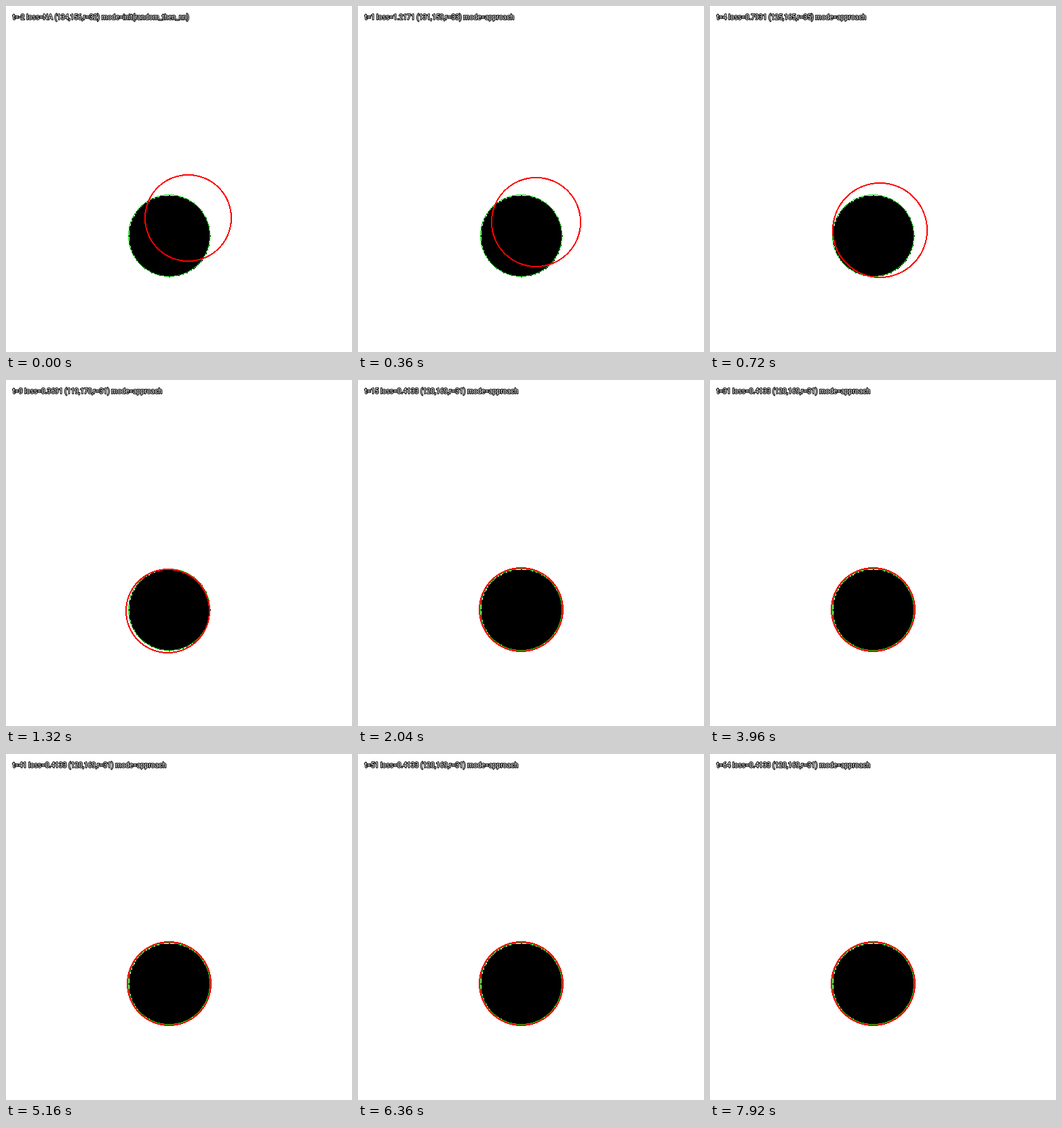
Animation of 510 by 510 pixels, one loop 8000 ms. Source, as an HTML page with a canvas:

```html
<!DOCTYPE html>
<html lang="en">
<head>
<meta charset="utf-8">
<title>Circle fitting</title>
<style>
  html, body { margin: 0; width: 100%; height: 100%; overflow: hidden; background: #fff; }
  canvas { display: block; }
</style>
</head>
<body>
<canvas id="stage" width="510" height="510"></canvas>
<script>
const ctx = document.getElementById('stage').getContext('2d');
const LOOP_MS = 8000, STEP_MS = 120, FIRST_STEP = -2;
const SCALE = 2;
const goal = { x: 120, y: 169, r: 30 };
const clamp = (v, lo, hi) => Math.min(hi, Math.max(lo, v));

// The guess moves two units per step, overshoots by one, then settles axis by axis
function guessAt(step) {
  const xSettled = step >= 13, ySettled = step >= 10;
  const t = Math.max(0, step);
  return {
    x: xSettled ? goal.x : clamp(133 - 2 * step, 119, 134),
    y: ySettled ? goal.y : clamp(157 + 2 * step, 156, 170),
    r: Math.round(Math.max(31, Math.min(32 + 0.75 * t, 41 - 1.5 * t))),
    loss: 0.3691 + 0.424 * Math.max(0, 7 - t) / 3 + 0.0221 * (xSettled + ySettled),
  };
}

// Paints every square cell around (cx, cy) whose offset passes the test
function cells(cx, cy, reach, size, color, inside) {
  ctx.fillStyle = color;
  for (let dy = -reach; dy <= reach; dy++) {
    for (let dx = -reach; dx <= reach; dx++) {
      if (inside(dx, dy)) ctx.fillRect((cx + dx) * size, (cy + dy) * size, size, size);
    }
  }
}

function disc({ x, y, r }) {
  cells(x, y, r, SCALE, '#000', (dx, dy) => Math.hypot(dx, dy) <= r);
}

// One-pixel outline: a single pixel along the longer axis of each offset
function outline({ x, y, r }, color) {
  const radius = r * SCALE;
  cells(x * SCALE, y * SCALE, radius, 1, color, (dx, dy) => {
    const [short, long] = [Math.abs(dx), Math.abs(dy)].sort((a, b) => a - b);
    return long === Math.round(Math.sqrt(radius ** 2 - short ** 2));
  });
}

function ring({ x, y, r }, width, color) {
  const outer = r * SCALE + 0.5;
  cells(x * SCALE, y * SCALE, r * SCALE, 1, color, (dx, dy) => {
    const d = Math.hypot(dx, dy);
    return d <= outer && d > outer - width;
  });
}

function label(text) {
  ctx.font = '10.3px Roboto, sans-serif';
  ctx.lineJoin = 'round';
  ctx.lineWidth = 2;
  ctx.strokeStyle = '#000';
  ctx.fillStyle = '#fff';
  ctx.strokeText(text, 10, 20);
  ctx.fillText(text, 10, 20);
}

function draw(step) {
  const guess = guessAt(step);
  const starting = step < 0;
  const loss = starting ? 'NA' : guess.loss.toFixed(4);
  const mode = starting ? 'init(random_then_nn)' : 'approach';
  ctx.fillStyle = '#fff';
  ctx.fillRect(0, 0, 510, 510);
  disc(goal);
  outline(goal, 'rgb(0,200,0)');
  ring(guess, 2, '#f00');
  label(`t=${step} loss=${loss} (${guess.x},${guess.y},r=${guess.r}) mode=${mode}`);
}

const start = performance.now();
let shown = null;
function tick() {
  const elapsed = (performance.now() - start) % LOOP_MS;
  const step = FIRST_STEP + Math.floor(elapsed / STEP_MS);
  if (step !== shown) draw(shown = step);
  requestAnimationFrame(tick);
}
tick();
</script>
</body>
</html>
```
